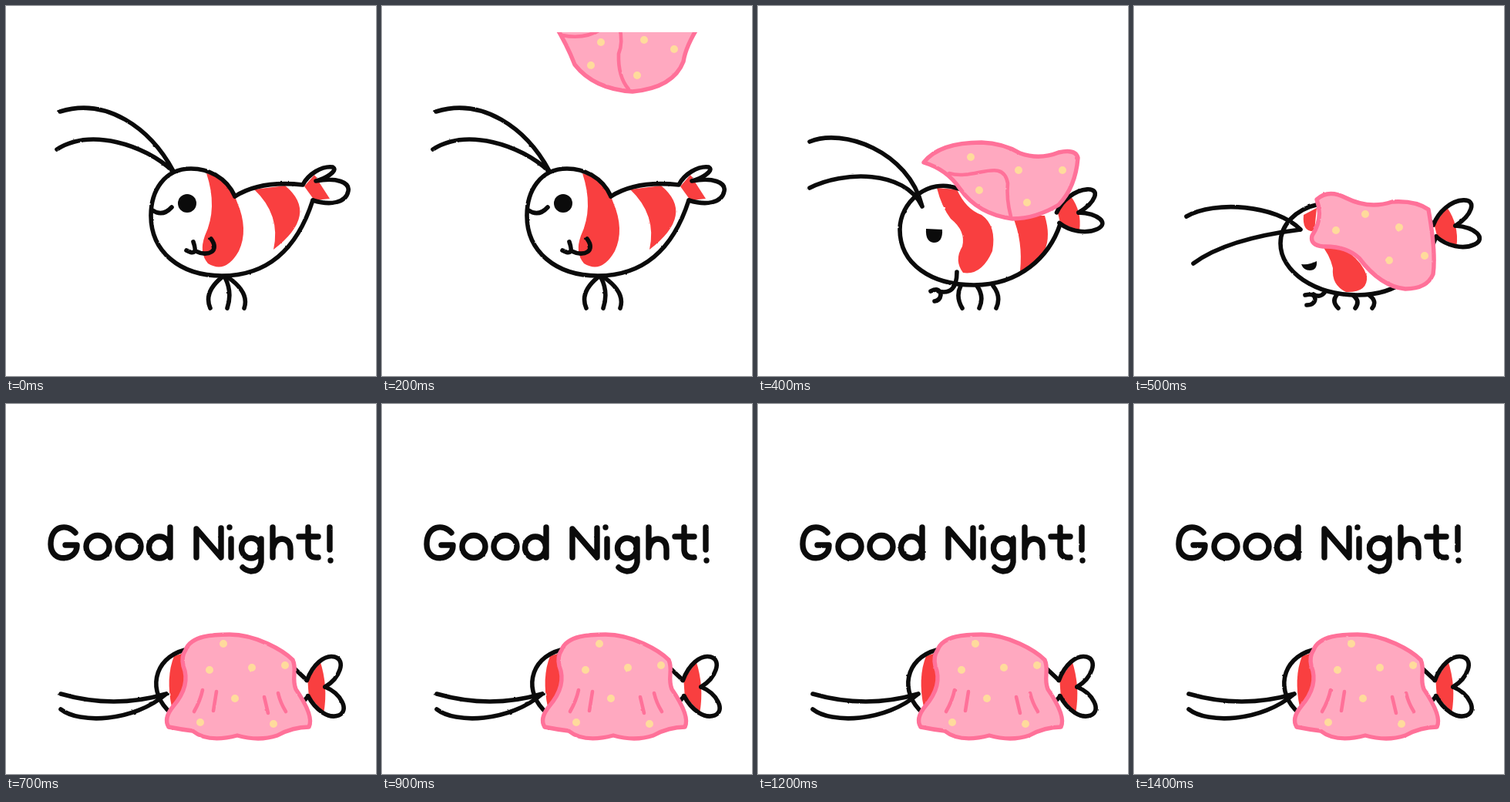
Recreate the animation shown at these times as an HTML page. Size 480 by 480 pixels, loop 1500 ms.

```html
<!DOCTYPE html>
<html lang="en">
<head>
<meta charset="utf-8">
<title>Good Night!</title>
<style>
html, body { margin: 0; width: 100%; height: 100%; overflow: hidden; background: #fff; }
svg { display: block; width: 100%; height: 100%; }
path { fill: none; stroke-linecap: round; stroke-linejoin: round; }
.ink { stroke: #0b0b0b; stroke-width: 5.6; }
.blot { fill: #0b0b0b; }
.red { fill: #f93f40; }
.cloth { fill: #ffa9c0; stroke: #ff7199; stroke-width: 5.4; }
.fold { stroke: #ff7199; stroke-width: 4.6; }
.dots { stroke: #ffdb9c; stroke-width: 10; }
.letters { stroke: #0b0b0b; stroke-width: 7.4; }

/* 15 poses of 100 ms, all hard cuts */
.step { opacity: 0; filter: url(#rough1); animation: 1500ms step-end infinite; }
#awake { animation-name: awake; }
#drowsy { animation-name: drowsy; }
#crouch { animation-name: crouch; }
#asleep { animation-name: asleep, boil; }
#drop { animation-name: drop; }
#land { animation-name: land; }
@keyframes awake { 0% { opacity: 1 } 26.667%, 100% { opacity: 0 } }
@keyframes drowsy { 26.667% { opacity: 1 } 33.333%, 100% { opacity: 0 } }
@keyframes crouch { 33.333% { opacity: 1 } 40%, 100% { opacity: 0 } }
@keyframes asleep { 40%, 100% { opacity: 1 } }
@keyframes drop {
  6.667% { opacity: 1; transform: translateY(-46px) }
  13.333% { opacity: 1; transform: none }
  20%, 100% { opacity: 0 }
}
@keyframes land {
  20% { opacity: 1; transform: translateY(-85px) }
  26.667% { opacity: 1; transform: none }
  33.333%, 100% { opacity: 0 }
}
/* two alternating line drawings */
@keyframes boil {
  40%, 53.333%, 66.667%, 80%, 93.333% { filter: url(#rough2) }
  46.667%, 60%, 73.333%, 86.667% { filter: url(#rough1) }
}
</style>
</head>
<body>
<svg viewBox="0 0 480 480" role="img" aria-label="Good Night!">
  <defs>
    <filter id="rough1" filterUnits="userSpaceOnUse" x="0" y="0" width="480" height="480" color-interpolation-filters="sRGB">
      <feTurbulence type="fractalNoise" baseFrequency=".2" seed="3"/>
      <feDisplacementMap in="SourceGraphic" scale="2" xChannelSelector="R" yChannelSelector="G"/>
    </filter>
    <filter id="rough2" filterUnits="userSpaceOnUse" x="0" y="0" width="480" height="480" color-interpolation-filters="sRGB">
      <feTurbulence type="fractalNoise" baseFrequency=".2" seed="11"/>
      <feDisplacementMap in="SourceGraphic" scale="2" xChannelSelector="R" yChannelSelector="G"/>
    </filter>
    <clipPath id="window"><path d="M0 34H480V480H0z"/></clipPath>
  </defs>

  <g id="awake" class="step">
    <path class="red" d="M260 217Q290 224 300 255Q315 290 302 318Q285 348 262 334Q250 320 258 298Q275 262 260 217"/>
    <path class="red" d="M322 238L362 233Q407 270 347 316Q357 271 322 238"/>
    <path class="red" d="M387 234L400 219L420 250L400 252z"/>
    <path class="ink" d="M297 247C286 222 262 211 240 211C205 211 188 240 188 272C188 318 225 350 280 350C345 350 380 308 398 252"/>
    <path class="ink" d="M297 247Q330 226 385 232C392 218 410 207 424 209C432 214 412 225 402 227C430 222 446 229 444 240C441 256 420 259 398 252"/>
    <path class="ink" d="M70 137C130 118 187 158 217 214M66 186C110 158 180 180 216 214"/>
    <path class="ink" d="M190 265Q203 274 215 261M234 317Q250 326 243 306M246 318C262 326 278 318 266 302"/>
    <circle class="blot" cx="235" cy="256" r="12"/>
  </g>

  <g id="drowsy" class="step">
    <path class="red" d="M232 236L258 238Q270 264 290 271Q310 285 304 318Q290 350 266 346Q254 330 265 312Q270 292 250 276Q238 260 232 236"/>
    <path class="red" d="M330 272H372Q388 325 340 344Q344 305 330 272"/>
    <path class="ink" d="M260 237C220 222 184 255 184 290C184 335 225 362 280 362C340 362 378 325 392 283"/>
    <path class="ink" d="M67 176C110 158 195 188 213 260M67 236C110 214 190 212 213 260"/>
    <path class="ink" d="M258 345Q258 376 234 370M224 370Q236 364 237 375Q236 382 229 383"/>
    <path class="blot" d="M218 289L239 290Q240 307 228 307Q217 306 218 289"/>
  </g>

  <g clip-path="url(#window)">
    <g id="drop" class="step">
      <path class="cloth" d="M224 24Q240 50 250 76Q275 108 325 111Q378 106 391 72Q394 52 412 24"/>
      <path class="fold" d="M308 26Q313 48 307 62Q306 92 320 108M234 38Q262 44 285 30"/>
      <path class="dots" d="M284 47h0M340 44h0M379 56h0M271 77h0M331 90h0"/>
    </g>
  </g>

  <g id="land" class="step">
    <path class="cloth" d="M215 203Q235 177 290 177Q318 178 340 191Q365 200 390 190Q412 185 415 197Q412 235 390 258Q360 276 330 276Q285 270 262 237Q245 212 215 203z"/>
    <path class="fold" d="M248 217C280 227 318 195 324 230Q322 250 328 273"/>
    <path class="dots" d="M276 196h0M338 213h0M395 213h0M287 239h0M349 255h0"/>
  </g>

  <g id="crouch" class="step">
    <path class="red" d="M220 271L237 262L234 292Q218 294 220 271M240 306Q290 315 302 350Q304 372 275 371Q256 362 258 340Q254 322 240 306"/>
    <path class="ink" d="M240 257C208 264 190 285 190 308C190 345 235 375 290 375C345 375 375 345 392 299M384 278L388 284"/>
    <path class="ink" d="M68 273C105 252 185 258 216 290M77 334Q120 302 216 290"/>
    <path class="ink" d="M247 372Q241 379 233 374M222 375Q234 372 235 380Q234 388 224 388"/>
    <path class="blot" d="M217 335Q228 336 237 331Q238 343 228 343Q220 343 217 335"/>
    <path class="cloth" d="M237 251Q252 237 275 249Q305 264 335 254Q365 252 382 264Q392 320 388 348Q380 367 352 367Q320 364 292 327Q275 311 245 312Q228 310 231 298Q246 275 237 251z"/>
    <path class="dots" d="M300 270h0M262 291h0M344 287h0M331 330h0M377 324h0"/>
  </g>

  <g id="asleep" class="step">
    <path class="red" d="M218 327L234 322V387L215 393Q207 355 218 327"/>
    <path class="ink" d="M232 319C190 330 183 375 214 401M373 342L390 358M392 379L384 388"/>
    <path class="ink" d="M71 376Q140 396 208 376M71 396C95 415 165 413 208 376"/>
    <path class="cloth" d="M233 319C240 300 270 299 290 299C325 299 360 320 372 332C378 345 370 355 376 370Q400 405 393 419Q372 419 352 430Q328 438 300 430Q262 440 242 424Q226 422 211 419Q204 408 217 392Q240 365 230 340Q227 328 233 319z"/>
    <path class="fold" d="M255 371Q252 385 244 399M273 373L269 398M335 380L340 401M353 375Q356 388 363 399"/>
    <path class="dots" d="M282 311h0M264 345h0M319 342h0M362 339h0M297 382h0M252 413h0M347 415h0"/>
  </g>
</svg>
<script>
const add = (id, cls, d) => {
  const p = document.createElementNS('http://www.w3.org/2000/svg', 'path');
  p.setAttribute('class', cls);
  p.setAttribute('d', d);
  document.getElementById(id).prepend(p);
};

// Rotate, scale and move every "x y" pair of a path.
function place(d, x, y, deg, sx, sy) {
  const c = Math.cos(deg * Math.PI / 180), s = Math.sin(deg * Math.PI / 180);
  return d.replace(/(-?\d+) (-?\d+)/g, (_, a, b) =>
    `${x + a * sx * c - b * sy * s} ${y + a * sx * s + b * sy * c}`);
}

// Heart-shaped tail with its notch at x, y: one lobe and its mirror image.
function tail(id, x, y, deg, sx, sy) {
  const lobe = 'M-23 -10C-14 -30 2 -42 15 -38C30 -33 20 -10 0 0';
  for (const side of [-1, 1]) add(id, 'ink', place(lobe, x, y, deg, sx, sy * side));
  add(id, 'red', place('M-4 -33Q4 0 -4 33L-22 10L-22 -10', x, y, deg, sx, sy));
}

// Three bowed legs; the feet stay put while the hips spread.
function legs(id, hipY, spread) {
  for (const k of [-1, 0, 1]) {
    const foot = 287 + 22 * k, knee = foot + (k < 0 ? -9 : 7);
    add(id, 'ink', `M${284 + spread * k} ${hipY}Q${knee} ${(hipY + 391) / 2} ${foot} 392`);
  }
}

const ring = (x, y, rx, ry) => `M${x - rx} ${y}a${rx} ${ry} 0 1 0 ${2 * rx} 0a${rx} ${ry} 0 1 0 ${-2 * rx} 0`;
const stem = (x, top = 160, foot = 199) => `M${x} ${top}V${foot}`;

tail('drowsy', 416, 268, -14, 1.2, .7);
tail('crouch', 417, 285, -14, 1.2, .78);
tail('asleep', 414, 367, -4, 1, 1);
legs('awake', 352, 4);
legs('drowsy', 363, 21);
legs('crouch', 375, 21);

add('asleep', 'letters', [
  'M90 167C80 155 58 157 58 182C58 207 93 204 92 183H77',
  ring(119, 185, 15, 14.5), ring(160, 185, 15, 14.5),
  ring(199, 186, 13.5, 14), stem(213),
  'M247 199V162L279 199V161',
  stem(290, 160, 160.1), stem(292, 175),
  ring(318, 187, 12.5, 13), 'M331 175V205Q329 217 318 217Q311 216 307 212',
  stem(346), 'M346 188Q349 175 358 175Q369 176 369 188V199',
  'M392 160V190Q393 200 405 199M380 172H405',
  stem(420, 160, 189), stem(421, 203, 203.1)
].join(''));
</script>
</body>
</html>
```
